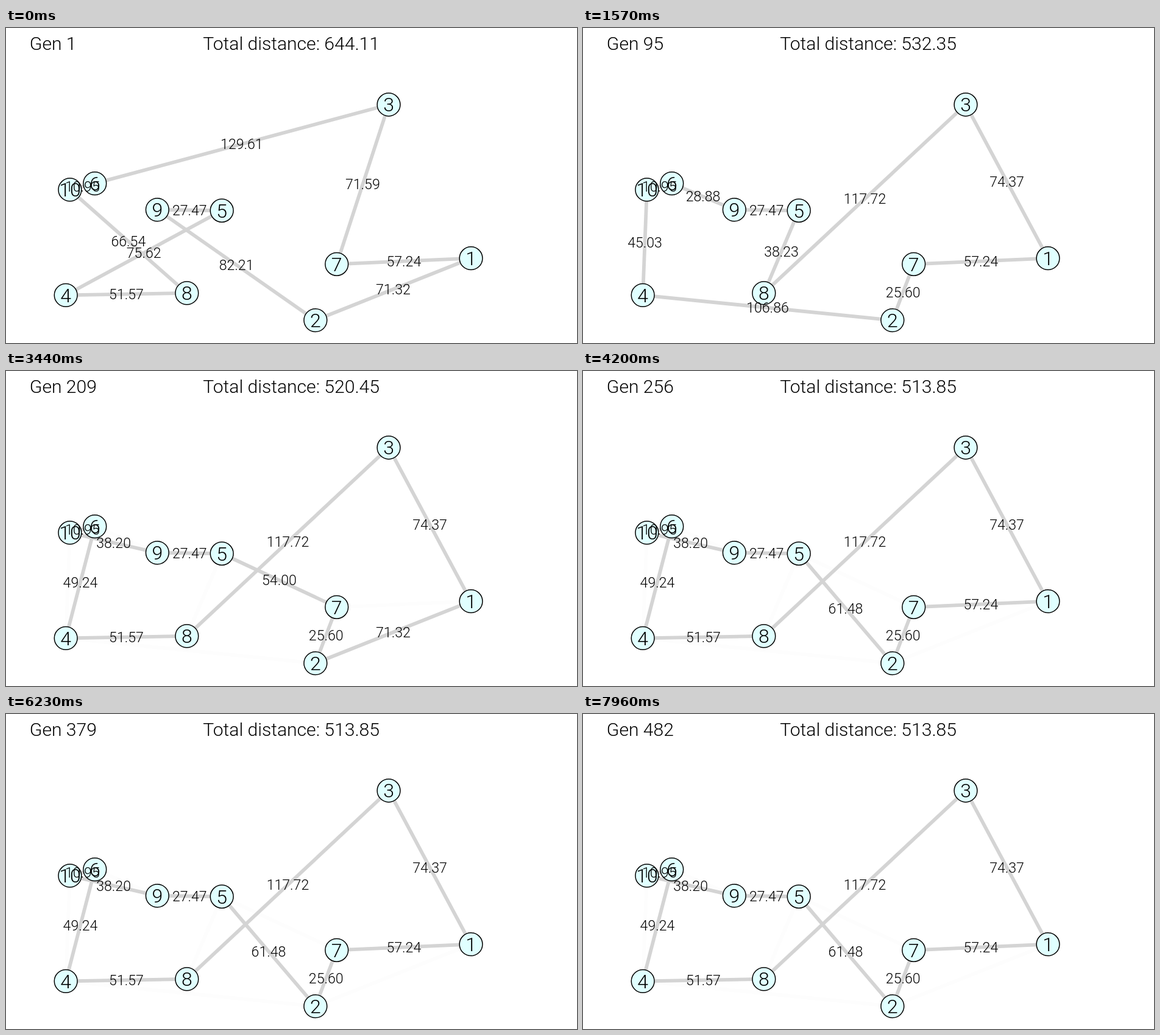
Recreate the animation shown at these times as an HTML page. Size 937 by 518 pixels, loop 8 s.

```html
<!DOCTYPE html>
<html lang="en">
<head>
<meta charset="utf-8">
<title>Shortest route search</title>
<style>
html, body { margin: 0; width: 100%; height: 100%; overflow: hidden; background: #fff; }
svg { display: block; width: 937px; height: 518px; }
text { font: 300 30.1px Roboto, sans-serif; }
line { stroke: #d4d4d4; stroke-width: 5.8; }
.ghost line { stroke: #fdfdfd; }
circle { fill: #e0ffff; stroke: #000; stroke-width: 1.5; }
.mid { text-anchor: middle; }
</style>
</head>
<body>
<svg viewBox="0 0 937 518">
  <g id="routes"></g>
  <g id="nodes"></g>
  <g id="labels"></g>
  <text x="38.8" y="36" id="gen"></text>
  <text x="323.2" y="36" id="total"></text>
</svg>
<script>
const LOOP = 8000, STEP = 78, LEAD = 16; // ms
const GENS_PER_STEP = 4.72;
const SCALE = 3.853; // pixels per unit of distance
const LABEL_SIZE = 23.1, NODE_SIZE = 32;

// City positions in distance units, measured from the stage point below
const center = [542.7, 388.3];
const cities = {
  1: [57.186, -2.488], 2: [-9.054, 23.946], 3: [22.141, -68.083], 4: [-115.373, 13.242],
  5: [-48.927, -22.852], 6: [-103.017, -34.422], 7: [0, -0.004], 8: [-63.812, 12.361],
  9: [-76.397, -23.212], 10: [-113.632, -31.75]
};
const tours = [
  { start: 0, order: '1 2 9 5 4 8 10 6 3 7' },
  { start: 4, order: '1 3 8 5 9 6 10 4 2 7' },
  { start: 33, order: '1 3 8 4 6 10 9 5 7 2' },
  { start: 50, order: '1 3 8 4 6 10 9 5 2 7' }
];

const byId = id => document.getElementById(id);
const place = city => city.map((v, axis) => center[axis] + v * SCALE);
const distance = ([a, b]) => Math.hypot(a[0] - b[0], a[1] - b[1]);

function add(parent, tag, attrs = {}, text = '') {
  const el = document.createElementNS('http://www.w3.org/2000/svg', tag);
  for (const key in attrs) el.setAttribute(key, attrs[key]);
  el.textContent = text;
  return parent.appendChild(el);
}

function addText(parent, [x, y], size, text) {
  const el = add(parent, 'text', { class: 'mid', x, y: y + size * 0.3555 }, text);
  el.style.fontSize = size + 'px';
}

function addLine(parent, edge) {
  const [[x1, y1], [x2, y2]] = edge.map(place);
  add(parent, 'line', { x1, y1, x2, y2 });
}

function addLabel(parent, edge) {
  const [a, b] = edge.map(place);
  addText(parent, [(a[0] + b[0]) / 2, (a[1] + b[1]) / 2], LABEL_SIZE, distance(edge).toFixed(2));
}

for (const tour of tours) {
  const stops = tour.order.split(' ').map(name => cities[name]);
  tour.edges = stops.map((stop, i) => [stop, stops[(i + 1) % stops.length]]);
  tour.total = tour.edges.reduce((sum, edge) => sum + distance(edge), 0).toFixed(2);
}

tours.forEach((tour, i) => {
  const route = add(byId('routes'), 'g');
  const labels = add(byId('labels'), 'g');
  // Routes given up after the opening one leave a faint trace
  const ghosts = add(route, 'g', { class: 'ghost' });
  tours.slice(1, Math.max(1, i)).forEach(old => old.edges.forEach(edge => addLine(ghosts, edge)));
  for (const edge of tour.edges) {
    addLine(route, edge);
    addLabel(labels, edge);
  }
  tour.groups = [route, labels];
});

for (const name in cities) {
  const [cx, cy] = place(cities[name]);
  add(byId('nodes'), 'circle', { cx, cy, r: 18.9 });
  addText(byId('nodes'), [cx, cy], NODE_SIZE, name);
}

let shown = -1;
function draw(t) {
  const step = Math.floor((t % LOOP + LEAD) / STEP);
  if (step === shown) return;
  shown = step;
  const current = tours.findLast(tour => tour.start <= step);
  for (const tour of tours)
    for (const group of tour.groups) group.style.display = tour === current ? '' : 'none';
  byId('gen').textContent = 'Gen ' + Math.round(1 + step * GENS_PER_STEP);
  byId('total').textContent = 'Total distance: ' + current.total;
}

const begin = performance.now();
function tick() {
  draw(performance.now() - begin);
  requestAnimationFrame(tick);
}
tick();
</script>
</body>
</html>
```
